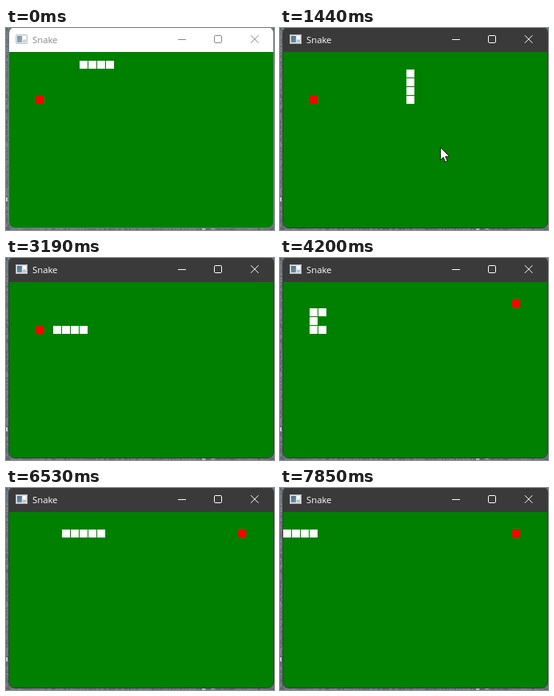
An HTML page that plays this animation: 335 px wide and 253 px high, repeating every 8 s.

```html
<!DOCTYPE html>
<html lang="en">
<head>
<meta charset="utf-8">
<title>Snake</title>
<style>
  html, body { margin: 0; width: 100%; height: 100%; overflow: hidden; background: #68737c; }
  svg { display: block; width: 335px; height: 253px; }
  text { font: 11.3px "Open Sans", "Noto Sans", sans-serif; }
  .bar { fill: #fff; }
  .edge { fill: none; stroke: #717c83; }
  .title { fill: #888; }
  .glyphs { fill: none; stroke: #858585; }
  .icon { opacity: .75; }
  .active .bar { fill: #3a3a3a; }
  .active .edge { stroke: #343b3b; }
  .active .title { fill: #fff; }
  .active .glyphs { stroke: #fff; }
  .active .icon { opacity: 1; }
</style>
</head>
<body>
<svg id="stage" viewBox="0 0 335 253">
  <defs>
    <clipPath id="frame"><rect x="4" y="-1" width="330.5" height="251" rx="7"/></clipPath>
    <clipPath id="field"><rect x="4" y="30" width="330.5" height="220"/></clipPath>
    <linearGradient id="pane" x2="1" y2="1">
      <stop offset="0" stop-color="#3f7286"/><stop offset="1" stop-color="#7d8fa5"/>
    </linearGradient>
  </defs>
  <rect width="335" height="253" fill="#68737c"/>
  <g id="desktop"></g>
  <g clip-path="url(#frame)">
    <rect class="bar" y="-1" width="335" height="31"/>
    <rect y="30" width="335" height="221" fill="#008000"/>
    <g clip-path="url(#field)"><g id="cells" fill="#fff" shape-rendering="crispEdges"></g></g>
  </g>
  <rect class="edge" x="3.5" y="-1.5" width="331" height="252" rx="7.5"/>
  <g class="icon">
    <rect x="12" y="8" width="15" height="12" rx="1" fill="#dfe3e5"/>
    <rect x="12.5" y="8.5" width="14" height="11" rx="1" fill="none" stroke="#a9b0b4"/>
    <rect x="14" y="10" width="6" height="8" fill="url(#pane)"/>
    <rect x="21" y="10" width="4" height="4" fill="#fff"/>
    <rect x="21" y="15" width="4" height="3" fill="#b9c3c9"/>
  </g>
  <text class="title" x="33" y="19">Snake</text>
  <g class="glyphs">
    <path d="M215 14.5h10"/>
    <rect x="260.5" y="9.5" width="9" height="9" rx="1.3"/>
    <path d="M306 9.2l9.6 9.6m0-9.6l-9.6 9.6"/>
  </g>
  <path id="cursor" d="M.5 .5v16l3.7-3.5 2.5 5.8 2.6-1.1-2.5-5.7h5.2z" fill="#fff" stroke="#111"/>
</svg>
<script>
const LOOP = 8000, PITCH = 11, SIZE = 10;
const $ = id => document.getElementById(id);

function addRect(parent, x, y, w, h, fill) {
  const r = document.createElementNS("http://www.w3.org/2000/svg", "rect");
  Object.entries({ x, y, width: w, height: h }).forEach(([k, v]) => r.setAttribute(k, v));
  if (fill) r.setAttribute("fill", fill);
  parent.append(r);
  return r;
}

// Grainy desktop showing around the window
let seed = 7;
const rand = () => (seed = seed * 16807 % 2147483647) / 2147483647;
function grain(x, y) {
  const v = 92 + Math.floor(rand() * 34);
  addRect($("desktop"), x, y, 2, 2, `rgb(${v},${v + 9},${v + 16})`);
}
for (let y = 0; y < 253; y += 2) { grain(0, y); grain(2, y); }
for (let x = 4; x < 335; x += 2) grain(x, 251);
addRect($("desktop"), 0, 212, 2, 5, "#c3c9cd");
addRect($("desktop"), 245, 251, 4, 2, "#b4bbc0");
addRect($("desktop"), 257, 251, 3, 1, "#a8b0b6");

// One turn letter per step, and the moment of each step
const route = "RRR" + "DDDD" + "L".repeat(11) + "UU" + "R".repeat(7) + "U" + "L".repeat(11);
const steps = [140, 430, 570, 710, 1000, 1150, 1440, 1580, 1730, 2020, 2170, 2460, 2600,
  2750, 3040, 3190, 3480, 3620, 3770, 4060, 4200, 4490, 4640, 4790, 5080, 5220, 5510,
  5660, 5810, 6100, 6240, 6530, 6680, 6820, 7120, 7260, 7550, 7700, 7850];
const dirs = { R: [1, 0], L: [-1, 0], U: [0, -1], D: [0, 1] };
const trail = [[8, 1], [9, 1], [10, 1], [11, 1]];
for (const c of route) {
  const [x, y] = trail[trail.length - 1];
  trail.push([x + dirs[c][0], y + dirs[c][1]]);
}
const EATEN = 18, START = 4;
const foods = [[3, 5], [26, 2]];

// Pointer: time, x, y; an empty place hides it
const pointer = [[0], [290, 208, 170], [430, 201, 152], [1290, 200, 149],
  [1870, 199, 153], [2310, 198, 157], [2750]];
const ACTIVATE = 430;

const body = Array.from({ length: START + 1 }, () => addRect($("cells"), 0, 0, SIZE, SIZE));
const food = addRect($("cells"), 0, 0, SIZE, SIZE, "#f00");

function place(rect, [col, row]) {
  rect.setAttribute("x", 4 + col * PITCH);
  rect.setAttribute("y", 30 + row * PITCH);
}

function draw(t) {
  const n = steps.filter(s => s <= t).length;
  const grown = n >= EATEN;
  const length = START + grown;
  body.forEach((cell, i) => place(cell, i < length ? trail[START - 1 + n - i] : [-9, 0]));
  place(food, foods[+grown]);

  $("stage").classList.toggle("active", t >= ACTIVATE);
  const [, x, y] = pointer.filter(p => p[0] <= t).pop();
  $("cursor").setAttribute("visibility", x ? "visible" : "hidden");
  if (x) $("cursor").setAttribute("transform", `translate(${x} ${y})`);
}

const begin = performance.now();
function tick() {
  draw((performance.now() - begin) % LOOP);
  requestAnimationFrame(tick);
}
tick();
</script>
</body>
</html>
```
